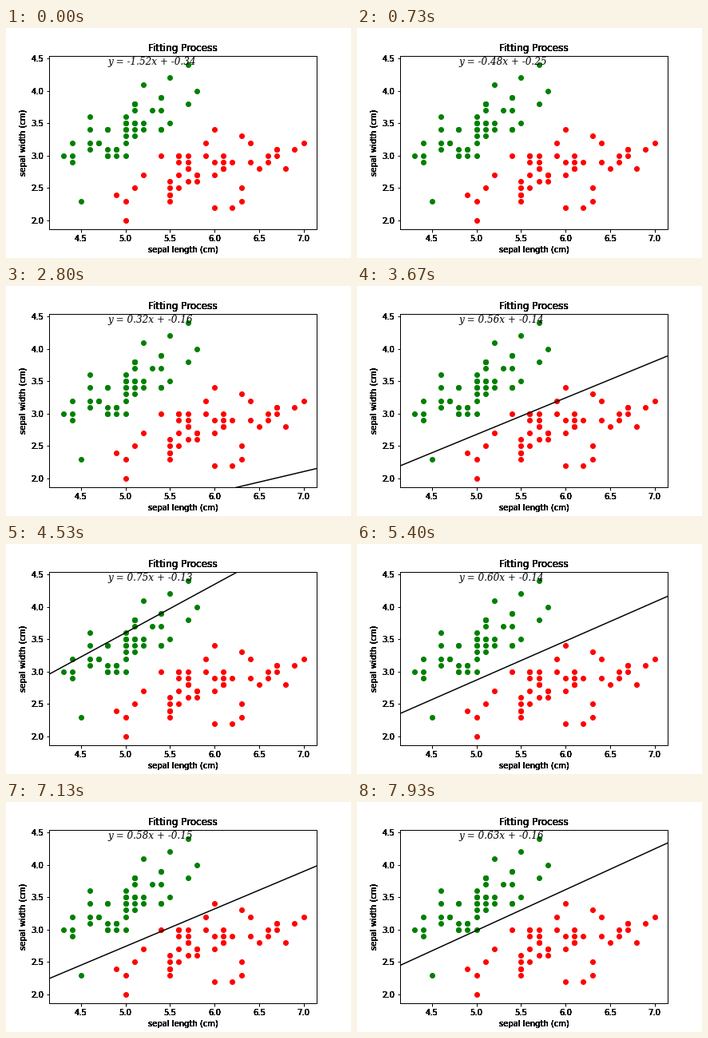
These frames come from a looping animation (432x288 px, 8000 ms). A matplotlib script:

```python
import numpy as np
import matplotlib.pyplot as plt
from matplotlib.animation import FuncAnimation

FRAMES = 120
LOOP_MS = 8000
XLIM = (4.1426, 7.1455)
YLIM = (1.8644, 4.5435)

plt.rcParams.update({
    "font.family": "DejaVu Sans",
    "font.size": 10,
    "axes.linewidth": 1,
    "xtick.major.width": 1,
    "ytick.major.width": 1,
})

# sepal widths grouped by sepal length
VERSICOLOR = {
    4.9: [2.4], 5.0: [2.0, 2.3], 5.1: [2.5], 5.2: [2.7], 5.4: [3.0],
    5.5: [2.3, 2.4, 2.4, 2.5, 2.6], 5.6: [2.5, 2.7, 2.9, 3.0, 3.0],
    5.7: [2.6, 2.8, 2.8, 2.9, 3.0], 5.8: [2.6, 2.7, 2.7],
    5.9: [3.0, 3.2], 6.0: [2.2, 2.7, 2.9, 3.4],
    6.1: [2.8, 2.8, 2.9, 3.0], 6.2: [2.2, 2.9], 6.3: [2.3, 2.5, 3.3],
    6.4: [2.9, 3.2], 6.5: [2.8], 6.6: [2.9, 3.0], 6.7: [3.0, 3.1, 3.1],
    6.8: [2.8], 6.9: [3.1], 7.0: [3.2],
}
SETOSA = {
    4.3: [3.0], 4.4: [2.9, 3.0, 3.2], 4.5: [2.3],
    4.6: [3.1, 3.2, 3.4, 3.6], 4.7: [3.2, 3.2],
    4.8: [3.0, 3.0, 3.1, 3.4, 3.4], 4.9: [3.0, 3.1, 3.1],
    5.0: [3.0, 3.2, 3.3, 3.4, 3.4, 3.5, 3.5, 3.6],
    5.1: [3.3, 3.4, 3.5, 3.5, 3.7, 3.8, 3.8, 3.8],
    5.2: [3.4, 3.5, 4.1], 5.3: [3.7], 5.4: [3.4, 3.4, 3.7, 3.9, 3.9],
    5.5: [3.5, 4.2], 5.7: [3.8, 4.4], 5.8: [4.0],
}

# fitted line at a few moments of the training
STEP = np.array([0, 23, 42, 68, 81, 94, 119])
SLOPE = np.array([-1.52, 0.23, 0.3237, 0.76, 0.602, 0.531, 0.633])
OFFSET = np.array([-0.34, -0.18, -0.16, -0.13, -0.14, -0.147, -0.156])
W2 = -1 / OFFSET
W1 = -SLOPE * W2


def fit(step):
    """Slope and offset, with the weights moving evenly between moments."""
    w1 = np.interp(step, STEP, W1)
    w2 = np.interp(step, STEP, W2)
    return -w1 / w2, -1 / w2


def scatter(ax, groups, color, label):
    points = [(x, y) for x, ys in groups.items() for y in ys]
    ax.scatter(*zip(*points), color=color, label=label)


def overdraw(text, times=8):
    """Paint a text repeatedly so its soft edges build up to solid."""
    draw = text.draw

    def repeat(renderer):
        for _ in range(times):
            draw(renderer)

    text.draw = repeat


fig = plt.figure(figsize=(6, 4), dpi=72, facecolor="white")
ax = fig.add_axes([0.125, 0.125, 0.775, 0.755])
scatter(ax, VERSICOLOR, "red", "versicolor")
scatter(ax, SETOSA, "green", "setosa")
ax.set(xlim=XLIM, ylim=YLIM,
       xticks=np.arange(4.5, 7.1, 0.5), yticks=np.arange(2, 4.6, 0.5),
       xlabel="sepal length (cm)", ylabel="sepal width (cm)",
       title="Fitting Process")
ax.legend(loc="lower right", bbox_to_anchor=(390, 255),
          bbox_transform=None, borderaxespad=0)

for text in [ax.title, ax.xaxis.label, ax.yaxis.label,
             *ax.get_xticklabels(), *ax.get_yticklabels()]:
    overdraw(text)

xs = np.array(XLIM)
line, = ax.plot([], [], color="black", lw=1.5)
equation = ax.text(4.8, 4.4, "", fontsize=12,
                   family="DejaVu Serif", style="italic")


def update(step):
    slope, offset = fit(step)
    line.set_data(xs, slope * xs + offset)
    equation.set_text(f"y = {slope:.2f}x + {offset:.2f}")
    return line, equation


anim = FuncAnimation(fig, update, frames=FRAMES, interval=LOOP_MS / FRAMES,
                     init_func=lambda: update(0), repeat=True, repeat_delay=0)
plt.show()
```
